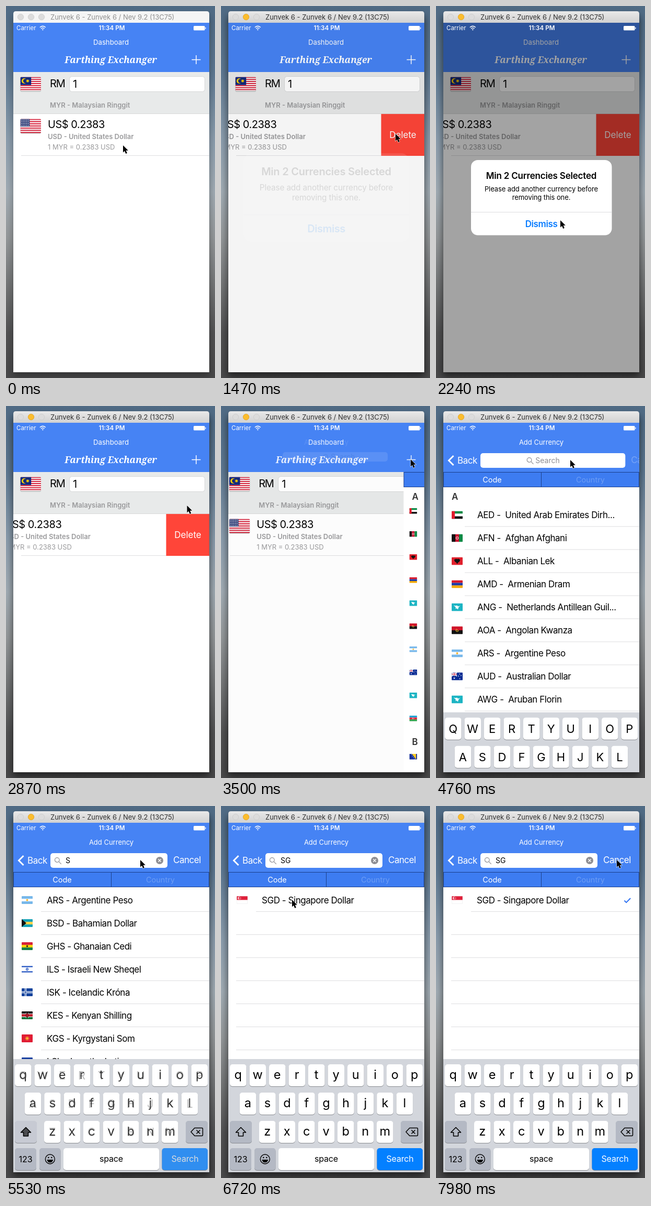
An HTML page that plays this animation: 400 px wide and 710 px high, repeating every 8000 ms.

```html
<!DOCTYPE html>
<html lang="en">
<head>
<meta charset="utf-8">
<title>Currency app</title>
<style>
html, body { margin: 0; width: 100%; height: 100%; overflow: hidden; }
svg { display: block; width: 400px; height: 710px; font-family: Inter, "Noto Sans", sans-serif; }
</style>
</head>
<body>
<svg id="stage" viewBox="0 0 400 710"></svg>
<script>
const LOOP = 8000, STEP = 70, BLUE = '#4683f4';
const $ = id => document.getElementById(id);

// ---- markup helpers
const text = (x, y, s, size, o = {}) =>
  `<text ${o.id ? `id="${o.id}"` : ''} x="${x}" y="${y}" font-size="${size}" font-weight="${o.w || 400}"
   fill="${o.fill || '#000'}" text-anchor="${o.a || 'start'}" letter-spacing="${o.ls || 0}">${s}</text>`;
const mid = (x, y, s, size, o = {}) => text(x, y, s, size, { ...o, a: 'middle' });
const rect = (x, y, w, h, fill, more = '') =>
  `<rect x="${x}" y="${y}" width="${w}" height="${h}" fill="${fill}" ${more}/>`;
const disc = (x, y, r, fill, more = '') => `<circle cx="${x}" cy="${y}" r="${r}" fill="${fill}" ${more}/>`;
const path = (d, fill, more = '') => `<path d="${d}" fill="${fill}" ${more}/>`;
const line = (x, y) => rect(x, y, 389 - x, 1, '#dedee0');
const star = (x, y, r, n, fill) => {
  const pts = [];
  for (let i = 0; i < 2 * n; i++) {
    const a = Math.PI * i / n, q = i % 2 ? r * .45 : r;
    pts.push((x + q * Math.sin(a)).toFixed(2) + ',' + (y - q * Math.cos(a)).toFixed(2));
  }
  return `<polygon points="${pts}" fill="${fill}"/>`;
};

// ---- flags on a 21 x 15 field
const bands = (list, down = true) => {
  const c = list.split(' '), n = c.length;
  return c.map((f, i) => down ? rect(0, 15 * i / n, 21, 15 / n + .1, f) : rect(21 * i / n, 0, 21 / n + .1, 15, f)).join('');
};
const striped = n => bands(Array.from({ length: n }, (_, i) => i % 2 ? '#fff' : '#d8203a').join(' '));
const moon = (x, y, r, fill, back) => disc(x, y, r, fill) + disc(x + r * .4, y, r * .8, back);
const dots = () => {
  let s = '';
  for (let i = 0; i < 20; i++) s += disc(1.2 + i % 5 * 1.7, 1.2 + (i / 5 | 0) * 1.9, .42, '#fff');
  return s;
};
const teal = bands('#1cb4c3') + path('M4 4l4 1 2-1 2 2 4-1-3 3-1 4-2-2-3 0 1-2z', '#fff');
const FLAGS = {
  MY: striped(14) + rect(0, 0, 11, 8.5, '#10287e') + moon(4, 4.2, 2.8, '#fc0', '#10287e') + star(7.4, 4.2, 2.1, 9, '#fc0'),
  US: striped(13) + rect(0, 0, 9.5, 8.1, '#3d4a80') + dots(),
  AED: bands('#0a8a45 #fff #111') + rect(0, 0, 6, 15, '#e01c2c'),
  AFN: bands('#111 #c8102e #0a8a45', false) + disc(10.5, 7.5, 2.3, 'none', 'stroke="#fff"'),
  ALL: bands('#e0202c') + path('M10.5 4l2-1 4 2-2 4-2 1-2 3-2-3-2-1-2-4 4-2z', '#111'),
  AMD: bands('#d8182c #1c3ca8 #f2a800'),
  ANG: teal, AWG: teal,
  AOA: bands('#d0162b #111') + disc(10.5, 7.5, 2.6, 'none', 'stroke="#fc3" stroke-dasharray="11 5"') + star(10.5, 7, 1.4, 5, '#fc3'),
  ARS: bands('#78b8ea #fff #78b8ea') + disc(10.5, 7.5, 1.9, '#f5b32f'),
  AUD: bands('#0a2c94') + path('M0 0l10 7M10 0l-10 7M5 0v7M0 3.5h10', 'none', 'stroke="#fff" stroke-width="2"') +
    path('M5 0v7M0 3.5h10', 'none', 'stroke="#d8203a"') + star(5, 11, 2, 7, '#fff') +
    [[15, 3], [18, 6], [13, 7], [15.5, 12]].map(p => star(...p, 1.3, 7, '#fff')).join(''),
  AZN: bands('#20a4d4 #e0243c #35a04c') + moon(10, 7.5, 2, '#fff', '#e0243c') + star(12.6, 7.5, 1.1, 8, '#fff'),
  BAM: bands('#16309a') + path('M7 0h11v15z', '#fc2') + [1, 5, 9, 13].map(y => star(5 + y * .68, y + 1, 1.2, 5, '#fff')).join(''),
  BSD: bands('#16a3b8 #fcd34a #16a3b8') + path('M0 0l9 7.5L0 15z', '#111'),
  GHS: bands('#d8203a #fcd10a #12804a') + star(10.5, 7.5, 2.5, 5, '#111'),
  ILS: bands('#fff') + rect(0, 1.4, 21, 2.2, '#1e50c0') + rect(0, 11.4, 21, 2.2, '#1e50c0') +
    path('M10.5 4.6l2.4 4.2h-4.8zM10.5 10.4l2.4-4.2h-4.8z', 'none', 'stroke="#1e50c0" stroke-width=".8"'),
  ISK: bands('#12429c') + path('M7.5 0v15M0 7.5h21', 'none', 'stroke="#fff" stroke-width="3.4"') +
    path('M7.5 0v15M0 7.5h21', 'none', 'stroke="#12429c" stroke-width="1.2"'),
  KES: bands('#111 #c01a2c #0a7038') + rect(0, 4.2, 21, 1, '#fff') + rect(0, 9.8, 21, 1, '#fff') +
    path('M8 2l5 11M13 2l-5 11', 'none', 'stroke="#fff" stroke-width=".7"') +
    `<ellipse cx="10.5" cy="7.5" rx="2" ry="4.2" fill="#c01a2c" stroke="#111" stroke-width=".7"/>`,
  KGS: bands('#e01c34') + star(10.5, 7.5, 4.8, 16, '#fc3') + disc(10.5, 7.5, 2.2, '#fc3', 'stroke="#e01c34" stroke-width=".6"'),
  LSL: bands('#1840a0 #fff #129048') + path('M10.5 5l2.6 5h-5.2z', '#111'),
  SGD: bands('#e0203a #fff') + moon(4.6, 3.8, 2.5, '#fff', '#e0203a') +
    [[6.5, 2.4], [8.2, 3.5], [5.8, 4.6], [7.6, 5.2]].map(p => disc(...p, .5, '#fff')).join('') +
    rect(.2, .2, 20.6, 14.6, 'none', 'rx="1" stroke="#d5d5d8" stroke-width=".4"')
};
const flag = (code, x, y, sx = 1, sy = sx, cls = '') =>
  `<g class="${cls}" data-y="${y}" transform="translate(${x} ${y}) scale(${sx} ${sy})"><g clip-path="url(#flagClip)">${FLAGS[code]}</g></g>`;
const bigFlag = (code, y) => rect(27.5, y + 1, 39.5, 27, '#000', 'rx="2" opacity=".3"') + flag(code, 27.5, y, 1.88, 1.8);

// ---- lists
const ALL = ['AED|United Arab Emirates Dirh...', 'AFN|Afghan Afghani', 'ALL|Albanian Lek', 'AMD|Armenian Dram',
  'ANG|Netherlands Antillean Guil...', 'AOA|Angolan Kwanza', 'ARS|Argentine Peso', 'AUD|Australian Dollar',
  'AWG|Aruban Florin', 'AZN|Azerbaijani Manat', 'BAM|Bosnia-Herzegovina Con...'];
const HITS = ['ARS|Argentine Peso', 'BSD|Bahamian Dollar', 'GHS|Ghanaian Cedi', 'ILS|Israeli New Sheqel',
  'ISK|Icelandic Króna', 'KES|Kenyan Shilling', 'KGS|Kyrgystani Som', 'LSL|Lesotho Loti'];
const name = { ls: -.45 };
const fullList = ALL.map((s, i) => {
  const [c, n] = s.split('|'), y = 186 + 44 * i + (i > 9 ? 29 : 0);
  return flag(c, 30, y + 14.5, 1, 1, 'small') + text(79, y + 28, `${c} -&#160; ${n}`, 17, name) +
    (i === 9 ? '' : line(55, y + 43.5));
}).join('') + text(30, 179, 'A', 17, { w: 600, fill: '#333' }) + text(30, 647, 'B', 17, { w: 600, fill: '#333' });
const hit = (s, i) => {
  const [c, n] = s.split('|'), y = 157 + 44 * i;
  return flag(c, 30, y + 15) + text(78, y + 29, `${c} - ${n}`, 17, name) + line(67, y + 44);
};

// ---- keyboard
const key = (x, y, w, fill, id = '') =>
  rect(x, y + 1, w, 42, '#898c91', 'rx="5"') + rect(x, y, w, 42, fill, `rx="5" id="${id}"`);
function keyboard() {
  let caps = '', keys = '', lows = '';
  [['qwertyuiop', 17, 493], ['asdfghjkl', 35.7, 547], ['zxcvbnm', 73, 601]].forEach(([row, x0, y]) =>
    [...row].forEach((ch, i) => {
      const x = x0 + 37.5 * i;
      keys += key(x, y, 31.5, '#fff');
      lows += mid(x + 15.7, y + 28, ch, 23.5);
      caps += mid(x + 15.7, y + 29, ch.toUpperCase(), 22);
    }));
  const G = '#b4b9c4', arrow = 'M38 613.5l9.5 9.5h-5v7h-9v-7h-5z';
  return rect(14, 483, 375, 216, '#d3d6dc') + keys + `<g id="lows">${lows}</g><g id="caps">${caps}</g>` +
    key(17, 601, 42, G, 'shiftKey') + path(arrow, '#000', 'id="shiftFill"') +
    path(arrow, 'none', 'stroke="#000" stroke-width="1.6" stroke-linejoin="round"') +
    key(344, 601, 42, G) + path('M354 622l7-7.5h14q1.5 0 1.5 1.5v12q0 1.5-1.5 1.5h-14zM364.5 618.5l7 7M371.5 618.5l-7 7',
      'none', 'stroke="#000" stroke-width="1.5" stroke-linejoin="round"') +
    key(17, 653, 41, G) + mid(37.5, 680, '123', 16) +
    key(64, 653, 40.5, G) + disc(84.3, 674, 9, 'none', 'stroke="#000" stroke-width="1.4"') +
    disc(81.3, 671, 1.3, '#000') + disc(87.3, 671, 1.3, '#000') + path('M78.5 675h11.6q-1 5.5-5.8 5.5t-5.8-5.5z', '#000') +
    key(110, 653, 183, '#fff') + mid(201.5, 679, 'space', 16, { ls: -.2 }) +
    key(298.5, 653, 87.5, G, 'goKey') + mid(342.5, 679, 'Search', 16, { id: 'goText', ls: -.2 });
}

const white = { fill: '#fff' }, grey = { fill: '#9a9a9c' };
$('stage').innerHTML = `
<defs>
  <clipPath id="screen"><rect x="14" y="32" width="375" height="667"/></clipPath>
  <clipPath id="listClip"><rect id="listBox" x="14" y="155" width="375" height="523"/></clipPath>
  <clipPath id="flagClip"><rect width="21" height="15" rx="1"/></clipPath>
  <linearGradient id="sky" x2="0" y2="1">
    <stop offset="0" stop-color="#4f6a84"/><stop offset=".17" stop-color="#5d7892"/>
    <stop offset=".36" stop-color="#8c9eae"/><stop offset=".5" stop-color="#a2adb5"/>
    <stop offset=".62" stop-color="#95999b"/><stop offset=".75" stop-color="#747677"/>
    <stop offset=".88" stop-color="#525253"/><stop offset="1" stop-color="#484849"/>
  </linearGradient>
  <linearGradient id="bar" x2="0" y2="1"><stop offset="0" stop-color="#e9e9e9"/><stop offset="1" stop-color="#d1d1d1"/></linearGradient>
  <filter id="blur" x="-20%" y="-20%" width="140%" height="140%"><feGaussianBlur stdDeviation="7"/></filter>
</defs>
${rect(0, 0, 400, 710, 'url(#sky)')}
${rect(12, 18, 379, 690, '#000', 'id="shade" rx="8" filter="url(#blur)"')}
${path('M14 32V15q0-5 5-5h365q5 0 5 5v17z', '#f5f5f5', 'id="titleBar"')}
${[28, 48, 68].map((x, i) => disc(x, 21, 5.7, '#dcdcdc', `id="dot${i}" stroke="#cbcbcb" stroke-width=".8"`)).join('')}
${text(85, 26, 'Zunvek 6 - Zunvek 6 / Nev 9.2 (13C75)', 13, { id: 'winTitle' })}
<g clip-path="url(#screen)">
  ${rect(14, 32, 375, 667, '#fff')}
  <g id="home">
    ${rect(14, 126, 375, 80, '#e8eaea')}
    ${bigFlag('MY', 135.5)}
    ${text(84, 155, 'RM', 20, { ls: -1.2 })}
    ${rect(121.5, 134.5, 259, 29, '#fff', 'rx="5" stroke="#d6d7d8"')}
    ${text(128, 156, '1', 20)}
    ${text(84, 194, 'MYR - Malaysian Ringgit', 13, { ...grey, w: 600 })}
    ${line(29, 285)}
    <g id="row">
      ${rect(14, 206, 375, 79, '#fff')}
      ${bigFlag('US', 215.5)}
      ${text(80, 233, 'US$ 0.2383', 20, { ls: -.45 })}
      ${text(80, 254, 'USD - United States Dollar', 13, { ...grey, w: 600 })}
      ${text(80, 274, '1 MYR = 0.2383 USD', 13, grey)}
      ${rect(389, 206, 90, 80, '#ff4539')}
      ${mid(430.5, 252, 'Delete', 17, white)}
    </g>
    ${rect(14, 205.3, 375, .8, '#d3d4d5')}
  </g>
  ${rect(14, 126, 375, 573, '#000', 'id="under"')}
  <g id="page">
    ${rect(14, 126, 375, 573, '#fff')}
    <g id="full" clip-path="url(#listClip)">${fullList}</g>
    <g id="hits">${HITS.map(hit).join('')}</g>
    <g id="single">${hit('SGD|Singapore Dollar', 0)}
      ${[1, 2, 3, 4, 5, 6, 7].map(i => line(29, 201 + 44 * i)).join('')}
      ${path('M360.5 180.5l3.7 3.7 8-8.2', 'none', 'id="tick" stroke="#2f72f2" stroke-width="2"')}
    </g>
  </g>
  <g id="tabs">
    <rect id="tabBox" y="126.5" width="374" height="28" fill="#3d7cf1" stroke="#1b3f8a"/>
    ${rect(201, 126, 1, 29, '#1b3f8a', 'id="divider"')}
    ${mid(0, 146, 'Code', 14.5, { ...white, id: 'code' })}
    ${mid(0, 146, 'Country', 14.5, { fill: '#6d9df5', id: 'country' })}
  </g>
  ${rect(14, 32, 375, 94, BLUE)}
  <g id="homeNav">
    ${mid(201, 74, 'Dashboard', 13.2, white)}
    <text id="brand" x="200.5" y="108.5" font-family="'Noto Serif', serif" font-style="italic" font-weight="600"
      font-size="17.4" fill="#fff" text-anchor="middle">Farthing Exchanger</text>
    ${path('M364 94v17M355.5 102.5h17', 'none', 'stroke="#fff" stroke-width="1.5"')}
  </g>
  <g id="addNav">
    ${mid(201.5, 74, 'Add Currency', 13, white)}
    <rect id="field" fill="#fff" rx="5"/>
    <g id="lens" fill="none" stroke="#8e8e93" stroke-width="1.2"><circle cx="4.8" cy="-1" r="4.3"/><path d="M8 2.2l4.7 4.7"/></g>
    ${text(0, 0, 'Search', 14, { id: 'query' })}
    <g id="clear">${disc(294, 104, 7, '#8e8e93')}${path('M291.3 101.3l5.4 5.4M296.7 101.3l-5.4 5.4', 'none', 'stroke="#fff" stroke-width="1.4"')}</g>
    ${text(0, 109, 'Cancel', 17, { ...white, id: 'cancel', ls: -.5 })}
  </g>
  <g id="back">
    ${path('M33.5 95l-9 9 9 9', 'none', 'stroke="#fff" stroke-width="3"')}
    ${text(41, 110, 'Back', 17, { ...white, id: 'backText', ls: -.45 })}
  </g>
  <g id="keys">${keyboard()}</g>
  ${rect(14, 32, 375, 667, '#000', 'id="dim"')}
  ${text(20, 46, 'Carrier', 11.5, white)}
  ${path('M64.8 40.8q5.5-4.8 11 0M67 43.2q3.3-2.8 6.6 0', 'none', 'stroke="#fff" stroke-width="1.5"')}
  ${path('M68.7 44.8q1.6-1.3 3.2 0l-1.6 1.9z', '#fff')}
  ${mid(202.5, 46, '11:34 PM', 11.7, { ...white, w: 600 })}
  ${rect(359, 38, 21.5, 8.5, '#fff', 'rx="1.5"')}${rect(381.2, 40.7, 1.3, 3.2, '#fff', 'rx=".6"')}
  <g id="alert">
    ${rect(67, 294, 269.5, 143.5, '#fff', 'rx="13"')}
    ${mid(201.5, 329.5, 'Min 2 Currencies Selected', 17, { w: 600, ls: -.2 })}
    ${mid(201.5, 354, 'Please add another currency before', 13, { ls: -.1 })}
    ${mid(201.5, 370, 'removing this one.', 13, { ls: -.1 })}
    ${rect(67, 393, 269.5, .8, '#d4d4d8')}
    ${mid(201.5, 422, 'Dismiss', 17, { w: 600, fill: '#0a7dff', ls: -.4 })}
  </g>
</g>
${path('M0 0v13.5l3.1-2.8 2.2 5.2 2.5-1.1-2.2-5.1h4.2z', '#000', 'id="cursor" stroke="#fff" stroke-width="1.1" paint-order="stroke"')}`;

// ---- motion: time, x, y
const POINTER = [[0, 224, 266], [210, 274, 246], [840, 274, 246], [1120, 192, 247], [1400, 334, 244], [1680, 334, 244],
  [2240, 238, 409], [2520, 238, 409], [2870, 346.5, 190], [3220, 363, 102], [3500, 363, 102], [3920, 335, 114],
  [4060, 325, 112], [4410, 257, 103], [6300, 257, 103], [6720, 136, 179], [7280, 136, 180], [7980, 346, 103]];
const part = (t, a, b) => Math.min(1, Math.max(0, (t - a) / (b - a)));
const smooth = u => u * u * (3 - 2 * u);
const mix = (a, b, u) => a + (b - a) * u;
const tint = (a, b, u) => `rgb(${a.map((v, i) => Math.round(mix(v, b[i], u)))})`;
const set = (id, o) => { for (const k in o) $(id).setAttribute(k, o[k]); };
const show = (id, v) => set(id, { opacity: +v });
const small = [...document.querySelectorAll('.small')];

function drawWindow(t) {
  const on = t >= 490;
  set('titleBar', { fill: on ? 'url(#bar)' : '#f5f5f5' });
  set('winTitle', { fill: on ? '#303030' : '#8f8f8f' });
  set('dot1', { fill: on ? '#fbbd2e' : '#dcdcdc', stroke: on ? '#dfa023' : '#cbcbcb' });
  show('shade', mix(.28, .5, part(t, 420, 630)));
}

function drawAlert(t) {
  const slide = -82.5 * (smooth(part(t, 840, 1190)) - smooth(part(t, 3220, 3430)));
  set('row', { transform: `translate(${slide})` });
  const rise = part(t, 1400, 1680) ** 1.55, a = rise * (1 - smooth(part(t, 2380, 2660)));
  show('dim', .36 * a);
  set('alert', { opacity: a, transform: `translate(201.5 365.5) scale(${1.2 - .2 * rise}) translate(-201.5 -365.5)` });
}

function drawPush(p, d, k, grow) {
  set('home', { transform: `translate(${-112 * p})` });
  show('under', .1 * p);
  set('page', { transform: `translate(${d})` });
  set('tabBox', { x: 14.5 + d });
  set('divider', { x: 201 + 2 * d });
  const label = { y: 146 - 1.5 * k, 'font-size': mix(14.5, 10.5, k) };
  set('code', { x: 107.5 + d, ...label });
  set('country', { x: 295.5 + 2 * d, ...label });
  show('tabs', p > 0);
  set('listBox', { height: mix(523, 544, grow) });
  for (const f of small) {
    const y = f.dataset.y - 5.5 * (1 - grow);
    f.setAttribute('transform', `translate(${mix(25, 30, grow)} ${y}) scale(${mix(.71, 1, grow)})`);
  }
  show('homeNav', 1 - p);
  set('brand', { x: 200.5 - 70 * p });
  show('addNav', p);
  show('back', p ** 9);
  set('backText', { x: 41 + 14 * k });
}

function drawSearch(t, k) {
  const f = smooth(part(t, 4620, 5040)), left = 85 + 33 * k, right = 381 - 62 * k - 72 * f;
  set('field', { x: left, y: 90 - 2 * k, width: right - left, height: 28 - 10 * k });
  const x = mix(202 - 7 * k, 93, f), typed = t >= 5880 ? 'SG' : t >= 5530 ? 'S' : '';
  set('lens', { transform: `translate(${x} ${104 - 6 * k})` });
  $('query').textContent = typed || 'Search';
  set('query', { x: x + 15 + 6 * f, y: 109 - 7 * k, fill: typed ? '#000' : '#8e8e93' });
  set('cancel', { x: 320 + 72 * (1 - f), opacity: f });
  show('clear', typed !== '');
  show('full', typed === '');
  show('hits', typed === 'S');
  show('single', typed === 'SG');
  show('tick', t >= 7000);
}

function drawKeys(t) {
  const up = 1 - (1 - part(t, 4620, 5250)) ** 3, c = part(t, 5460, 5553);
  set('keys', { transform: `translate(0 ${216 * (1 - up)})` });
  show('lows', c);
  show('caps', 1 - c);
  set('shiftKey', { fill: tint([255, 255, 255], [180, 185, 196], c) });
  show('shiftFill', t >= 5600 ? 0 : 1 - .5 * c);
  set('goKey', { fill: tint([180, 185, 196], [4, 128, 255], c) });
  set('goText', { fill: tint([110, 114, 122], [255, 255, 255], c) });
}

function drawPointer(t) {
  let i = 0;
  while (i < POINTER.length - 2 && t >= POINTER[i + 1][0]) i++;
  const [a, x, y] = POINTER[i], [b, x2, y2] = POINTER[i + 1], u = smooth(part(t, a, b));
  set('cursor', { transform: `translate(${mix(x, x2, u)} ${mix(y, y2, u)})` });
}

function draw(t) {
  const p = smooth(part(t, 3360, 4055)), d = 375 * (1 - p), k = Math.min(1, d / 37);
  drawWindow(t);
  drawAlert(t);
  drawPush(p, d, k, smooth(part(t, 4060, 4410)));
  drawSearch(t, k);
  drawKeys(t);
  drawPointer(t);
}

const start = performance.now();
function tick() {
  const t = (performance.now() - start) % LOOP;
  draw(Math.floor(t / STEP) * STEP);
  requestAnimationFrame(tick);
}
tick();
</script>
</body>
</html>
```
